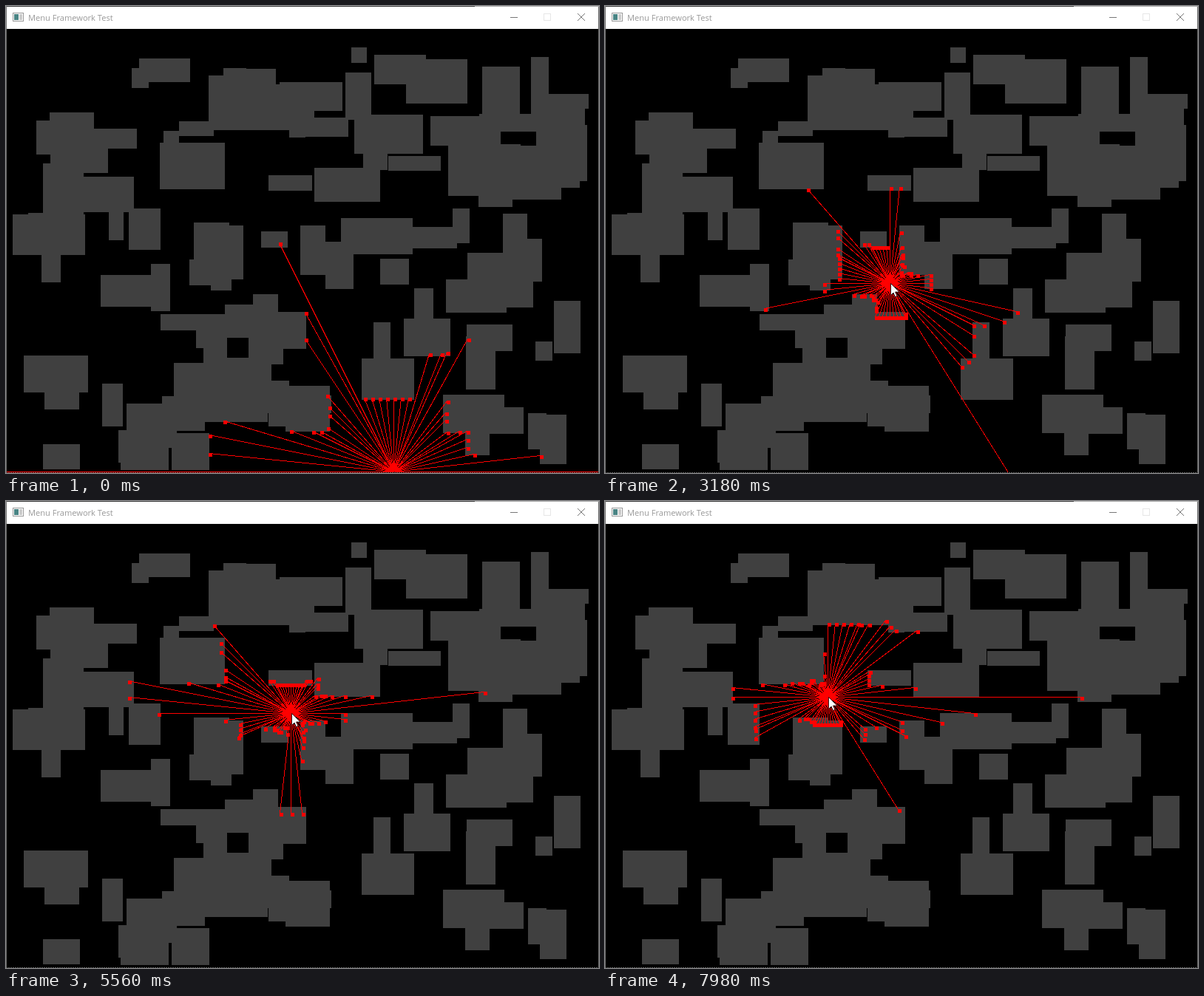
An HTML page that plays this animation: 802x632 px, repeating every 8000 ms.

```html
<!DOCTYPE html>
<html lang="en">
<head>
<meta charset="utf-8">
<title>Menu Framework Test</title>
<style>
html, body { margin: 0; width: 100%; height: 100%; overflow: hidden; background: #000; }
svg { display: block; }
text { font: 11.1px "Open Sans", "Noto Sans", sans-serif; fill: #999; }
</style>
</head>
<body>
<svg width="802" height="632" viewBox="0 0 802 632">
  <defs><clipPath id="client"><rect x="1" y="31" width="800" height="600"/></clipPath></defs>
  <rect width="802" height="632"/>
  <g id="walls" fill="#404040" shape-rendering="crispEdges">
    <!-- top left -->
    <rect x="180" y="71" width="69" height="32"/>
    <rect x="170" y="84" width="23" height="27"/>
    <rect x="59" y="144" width="60" height="57"/>
    <rect x="41" y="155" width="78" height="46"/>
    <rect x="60" y="166" width="78" height="60"/>
    <rect x="60" y="166" width="117" height="27"/>
    <rect x="50" y="213" width="55" height="70"/>
    <rect x="50" y="231" width="123" height="48"/>
    <rect x="139" y="270" width="20" height="47"/>
    <rect x="30" y="280" width="25" height="5"/>
    <rect x="9" y="282" width="98" height="55"/>
    <rect x="48" y="330" width="26" height="44"/>
    <rect x="166" y="274" width="43" height="56"/>
    <rect x="213" y="169" width="21" height="20"/>
    <rect x="208" y="185" width="88" height="63"/>
    <!-- top centre -->
    <rect x="467" y="56" width="21" height="21"/>
    <rect x="498" y="66" width="70" height="40"/>
    <rect x="541" y="72" width="83" height="60"/>
    <rect x="294" y="84" width="31" height="20"/>
    <rect x="294" y="85" width="71" height="60"/>
    <rect x="274" y="94" width="91" height="74"/>
    <rect x="340" y="106" width="77" height="62"/>
    <rect x="370" y="103" width="85" height="39"/>
    <rect x="383" y="151" width="80" height="26"/>
    <rect x="383" y="168" width="22" height="10"/>
    <rect x="234" y="156" width="47" height="20"/>
    <rect x="459" y="90" width="35" height="64"/>
    <rect x="471" y="147" width="93" height="53"/>
    <rect x="483" y="190" width="33" height="32"/>
    <rect x="517" y="203" width="71" height="20"/>
    <rect x="355" y="229" width="59" height="21"/>
    <rect x="417" y="219" width="89" height="46"/>
    <!-- top right -->
    <rect x="644" y="82" width="51" height="70"/>
    <rect x="710" y="69" width="24" height="80"/>
    <rect x="734" y="119" width="54" height="20"/>
    <rect x="717" y="119" width="66" height="70"/>
    <rect x="640" y="146" width="143" height="24"/>
    <rect x="574" y="149" width="95" height="40"/>
    <rect x="640" y="187" width="56" height="10"/>
    <rect x="717" y="161" width="69" height="76"/>
    <rect x="598" y="180" width="70" height="77"/>
    <rect x="639" y="189" width="46" height="83"/>
    <rect x="685" y="189" width="66" height="73"/>
    <rect x="685" y="189" width="91" height="57"/>
    <!-- middle -->
    <rect x="196" y="349" width="26" height="64"/>
    <rect x="128" y="364" width="94" height="43"/>
    <rect x="254" y="293" width="48" height="85"/>
    <rect x="254" y="297" width="67" height="73"/>
    <rect x="248" y="343" width="57" height="35"/>
    <rect x="277" y="360" width="28" height="25"/>
    <rect x="345" y="305" width="36" height="22"/>
    <rect x="398" y="297" width="34" height="67"/>
    <rect x="432" y="319" width="38" height="64"/>
    <rect x="453" y="287" width="97" height="49"/>
    <rect x="540" y="299" width="70" height="29"/>
    <rect x="604" y="274" width="23" height="47"/>
    <rect x="506" y="342" width="39" height="35"/>
    <rect x="672" y="281" width="33" height="60"/>
    <rect x="672" y="315" width="53" height="58"/>
    <rect x="624" y="334" width="89" height="74"/>
    <rect x="595" y="370" width="82" height="45"/>
    <!-- bottom left -->
    <rect x="334" y="390" width="34" height="30"/>
    <rect x="296" y="404" width="72" height="45"/>
    <rect x="209" y="417" width="120" height="22"/>
    <rect x="257" y="417" width="42" height="46"/>
    <rect x="267" y="439" width="32" height="45"/>
    <rect x="328" y="414" width="78" height="50"/>
    <rect x="328" y="440" width="47" height="45"/>
    <rect x="227" y="483" width="42" height="92"/>
    <rect x="269" y="476" width="85" height="87"/>
    <rect x="340" y="476" width="19" height="75"/>
    <rect x="355" y="507" width="28" height="62"/>
    <rect x="378" y="514" width="60" height="62"/>
    <rect x="430" y="527" width="10" height="24"/>
    <rect x="211" y="528" width="58" height="47"/>
    <rect x="163" y="538" width="68" height="60"/>
    <rect x="152" y="574" width="68" height="44"/>
    <rect x="155" y="574" width="65" height="54"/>
    <rect x="224" y="578" width="51" height="50"/>
    <rect x="24" y="473" width="87" height="50"/>
    <rect x="52" y="520" width="47" height="26"/>
    <rect x="130" y="511" width="28" height="58"/>
    <rect x="50" y="593" width="50" height="34"/>
    <!-- bottom right -->
    <rect x="741" y="399" width="36" height="71"/>
    <rect x="716" y="454" width="23" height="26"/>
    <rect x="552" y="382" width="26" height="45"/>
    <rect x="538" y="423" width="63" height="51"/>
    <rect x="497" y="428" width="23" height="50"/>
    <rect x="481" y="477" width="71" height="56"/>
    <rect x="623" y="431" width="62" height="36"/>
    <rect x="622" y="447" width="40" height="72"/>
    <rect x="591" y="526" width="83" height="52"/>
    <rect x="621" y="543" width="79" height="36"/>
    <rect x="621" y="570" width="33" height="38"/>
    <rect x="706" y="551" width="25" height="49"/>
    <rect x="722" y="553" width="36" height="67"/>
  </g>
  <g shape-rendering="crispEdges">
    <path d="M 0.5 31 V 632 M 801.5 0 V 632" stroke="#6a6a6a"/>
    <path d="M 0 631.5 H 802" stroke="#5a5a5a" stroke-dasharray="2 1"/>
    <rect x="1" y="1" width="800" height="30" fill="#fff"/>
    <path d="M 0 0.5 H 634" stroke="#3a3a3a"/>
    <path d="M 634 0.5 H 802" stroke="#aaa"/>
    <path d="M 0.5 0 V 31" stroke="#777"/>
    <rect x="9.5" y="9.5" width="14" height="11" fill="#fff" stroke="#999"/>
    <rect x="11" y="11" width="6" height="8" fill="#4a8585"/>
    <rect x="18" y="11" width="4" height="8" fill="#ccc"/>
    <path d="M 682 15.5 H 692" stroke="#777"/>
    <rect x="727.5" y="10.5" width="9" height="9" fill="none" stroke="#e6e6e6"/>
  </g>
  <path d="M 773 10 L 783 20 M 783 10 L 773 20" stroke="#777"/>
  <text x="30" y="20">Menu Framework Test</text>
  <g clip-path="url(#client)">
    <path id="rays" stroke="#f00" fill="none" shape-rendering="crispEdges"/>
    <path id="hits" fill="#f00" shape-rendering="crispEdges"/>
    <polygon id="cursor" points="0.5,0.5 0.5,16.5 4,13 6.5,18.5 9,17.5 6.5,12 12,12" fill="#fff" stroke="#000" stroke-width="0.8"/>
  </g>
</svg>
<script>
const LOOP = 8000, TICK = 50, STEP = 10, DOT = 5;
const $ = id => document.getElementById(id);

// Pointer stops: time, x, y
const track = [
  [300, 524, 630], [700, 491, 600], [1100, 452, 521], [1150, 446, 499],
  [1250, 440, 464], [1500, 420, 420], [1700, 412, 401], [2150, 426, 400],
  [2450, 409, 391], [2850, 385, 375], [2950, 385, 375], [3150, 385, 375],
  [3750, 386, 364], [4400, 386, 322], [4650, 387, 296], [4900, 386, 288],
  [5100, 386, 288], [5700, 384, 287], [5850, 384, 287], [6600, 375, 289],
  [7450, 331, 276], [7950, 301, 265]
];

function pointer(t) {
  const next = track.findIndex(k => k[0] > t);
  if (next === 0) return track[0].slice(1);
  if (next < 0) return track[track.length - 1].slice(1);
  const [t0, x0, y0] = track[next - 1], [t1, x1, y1] = track[next];
  const p = (t - t0) / (t1 - t0);
  return [Math.round(x0 + (x1 - x0) * p), Math.round(y0 + (y1 - y0) * p)];
}

// Whole-pixel steps, one per degree; equal ones are kept once
const steps = new Map();
for (let deg = 0.5; deg < 360; deg++) {
  const a = deg * Math.PI / 180;
  const step = [Math.floor(STEP * Math.cos(a)), Math.floor(STEP * Math.sin(a))];
  steps.set(step.join(), step);
}

const walls = [...$("walls").children].map(el => {
  const [x, y, w, h] = ["x", "y", "width", "height"].map(n => +el.getAttribute(n));
  return { x, y, right: x + w, bottom: y + h };
});
const solid = (x, y) =>
  walls.some(w => x >= w.x && x < w.right && y >= w.y && y < w.bottom);
const inside = (x, y) => x >= 1 && x < 801 && y >= 31 && y < 631;

function cast(x, y, dx, dy) {
  do { x += dx; y += dy; } while (inside(x, y) && !solid(x, y));
  return [x, y];
}

let last = "";
function draw(t) {
  const [ox, oy] = pointer(Math.floor(t / TICK) * TICK);
  const key = ox + "," + oy;
  if (key === last) return;
  last = key;
  let rays = "", hits = "";
  for (const [dx, dy] of steps.values()) {
    const [x, y] = cast(ox, oy, dx, dy);
    rays += `M ${ox + 0.5} ${oy + 0.5} L ${x + 0.5} ${y + 0.5} `;
    if (inside(x, y)) hits += `M ${x} ${y} h ${DOT} v ${DOT} h ${-DOT} z `;
  }
  $("rays").setAttribute("d", rays);
  $("hits").setAttribute("d", hits);
  $("cursor").setAttribute("transform", `translate(${ox + 1} ${oy})`);
}

function frame() {
  draw(performance.now() % LOOP);
  requestAnimationFrame(frame);
}
frame();
</script>
</body>
</html>
```
